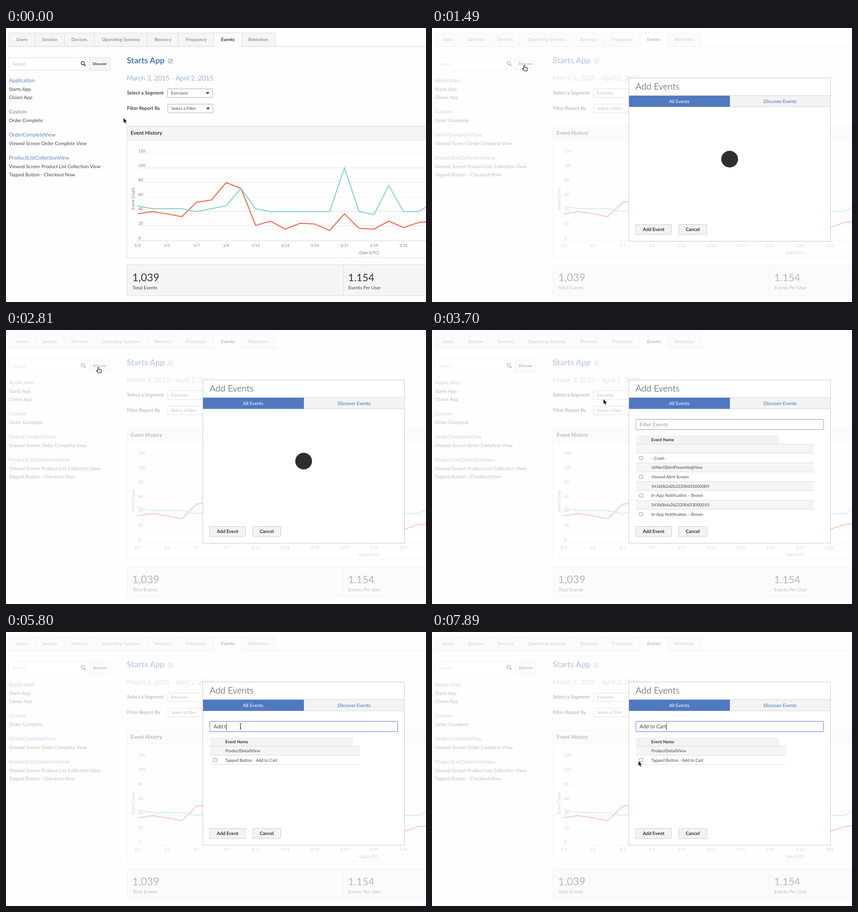
Animation, 925 px wide and 606 px high, one loop 8 s. Source, as an HTML page:

```html
<!DOCTYPE html>
<html lang="en">
<head>
<meta charset="utf-8">
<title>Add events</title>
<style>
  html, body { margin: 0; width: 100%; height: 100%; overflow: hidden; background: #fefefe; }
  svg { display: block; width: 100%; height: 100%; }
  text { font-family: Lato, "Open Sans", sans-serif; text-rendering: geometricPrecision; white-space: pre; }
</style>
</head>
<body>
<svg id="stage" viewBox="0 0 925 606"></svg>
<script>
const INK = '#444', GRAY = '#999', BLUE = '#4c77bd', LINK = '#5b84c7', PANEL = '#f5f5f5', LINE = '#dcdcdc';

// Drawing helpers
const text = (x, y, s, size, fill = INK, attrs = '') =>
  `<text x="${x}" y="${y}" font-size="${size}" fill="${fill}" ${attrs}>${s}</text>`;
const bold = 'font-weight="700"', light = 'font-weight="300"', middle = 'text-anchor="middle"';
const box = (x, y, w, h, fill, stroke = 'none', attrs = '') =>
  `<rect x="${x}" y="${y}" width="${w}" height="${h}" fill="${fill}" stroke="${stroke}" ${attrs}/>`;
const path = (d, stroke, width = 1, fill = 'none') =>
  `<path d="${d}" stroke="${stroke}" stroke-width="${width}" fill="${fill}"/>`;

function tabs() {
  const names = ['Users', 'Session', 'Devices', 'Operating Systems', 'Recency', 'Frequency', 'Events', 'Retention'];
  const edges = [6.5, 63.5, 128.5, 194.5, 311.5, 379.5, 458.5, 518.5, 593];
  let out = box(6.5, 11, 586.5, 30, PANEL, LINE) + path('M6 41H925', LINE);
  names.forEach((name, i) => {
    const active = name === 'Events', x = edges[i];
    if (active) out += box(x, 11.5, edges[i + 1] - x, 31, '#fefefe');
    if (i) out += path(`M${x} 11V41`, LINE);
    out += text((x + edges[i + 1]) / 2, 29.3, name, 10, active ? '#333' : GRAY, `${bold} ${middle}`);
  });
  return out + path('M458 11H519', LINE);
}

function sidebar() {
  const heads = [['Application', 119.5], ['Custom', 188.5], ['OrderCompleteView', 240], ['ProductListCollectionView', 291]];
  const items = [['Starts App', 139], ['Closes App', 157], ['Order Complete', 208],
    ['Viewed Screen Order Complete View', 259.3], ['Viewed Screen Product List Collection View', 310.4],
    ['Tapped Button - Checkout Now', 328.3]];
  return box(6.5, 65.5, 177.5, 28, '#fff', LINE) + box(184, 65.5, 45, 28, PANEL, LINE) +
    text(14.5, 82.5, 'Search', 10, '#bbb') + text(206.5, 82, 'Discover', 8, '#333', `${bold} ${middle}`) +
    `<circle cx="169" cy="77.7" r="3.6" fill="none" stroke="#444" stroke-width="1.7"/>` +
    path('M171.8 80.5L175.3 84', '#444', 2.3) +
    heads.map(([s, y]) => text(6.5, y, s, 11.45, LINK)).join('') +
    items.map(([s, y]) => text(6.5, y, s, 10.5)).join('');
}

function select(x, y, label) {
  return box(x, y, 99.5, 19, '#fff', '#aaa', 'rx="1"') + text(x + 7.7, y + 12.3, label, 9.1) +
    path(`M${x + 84.5} ${y + 7.6}h8l-4 4.4z`, 'none', 0, '#333');
}

function header() {
  return text(266, 78.3, 'Starts App', 18, BLUE, bold) +
    path('M364 68.5H357.5V77.5H366.5V72', '#999') + path('M360 75.5L366.5 68.5', '#888', 1.8) +
    text(266, 115.5, 'March 3, 2015 - April 2, 2015', 14.8, BLUE, light) +
    text(266.5, 146.8, 'Select a Segment', 10.6, INK, bold) + select(355.5, 134.5, 'Everyone') +
    text(266.5, 181.4, 'Filter Report By', 10.4, INK, bold) + select(356.5, 168.5, 'Select a Filter');
}

function chart() {
  const dayX = d => 289.5 + d * 32.556, valueY = v => 470.5 - v * 1.608;
  const line = (values, color) =>
    path('M' + values.map((v, d) => `${dayX(d).toFixed(1)} ${valueY(v).toFixed(1)}`).join('L'), color, 2.2);
  let out = box(266.5, 217.5, 700, 290, '#fefefe', LINE) + box(266.5, 217.5, 700, 30, PANEL, LINE) +
    text(274.5, 236, 'Event History', 11.45, '#333', bold);
  for (let v = 0; v <= 120; v += 20) {
    const y = Math.round(valueY(v)) - .5;
    out += path(`M289.5 ${y}H925`, v % 60 ? '#e2e2e2' : v ? '#f1f1f1' : '#d8d8d8') +
      text(291.5, y - 3, v, 8.8, '#777');
  }
  for (let d = 0; d < 20; d += 2)
    out += path(`M${dayX(d)} 470V475`, '#d8d8d8') + text(dayX(d), 483.7, `3/${d + 3}`, 8.3, '#777', middle);
  return out + text(799.5, 500, 'Date (UTC)', 8.85, '#777', middle) +
    text(0, 0, 'Event Count', 9, '#777', `${middle} transform="translate(282.5 377.5) rotate(-90)"`) +
    line([37, 40, 37, 33, 53, 56, 80, 72, 21, 27, 16, 24, 23, 14, 37, 17, 16, 27, 18, 25, 27], '#f3664a') +
    line([48, 44, 44, 44, 40, 44, 48, 72, 44, 40, 40, 40, 40, 40, 100, 40, 36, 76, 40, 40, 52], '#83d2d5');
}

const totals = () => box(266.5, 523.5, 476, 68.5, PANEL, LINE) + box(742.5, 523.5, 300, 68.5, PANEL, LINE) +
  text(278, 559.5, '1,039', 23.5, '#333') + text(278.5, 577.5, 'Total Events', 10.35) +
  text(753.5, 559.5, '1.154', 22.5, '#333') + text(754, 577.5, 'Events Per User', 10.35);

const button = (x, w, label) => box(x, 434.5, w, 22, '#f3f3f3', '#ccc', 'rx="1"') +
  text(x + w / 2, 449.2, label, 10.35, '#333', `${bold} ${middle}`);

const dialog = () => box(433.5, 110.5, 444, 361, '#fff', '#c8c8c8') + text(448.5, 136.3, 'Add Events', 19.8, '#333', light) +
  box(656, 149.5, 221.5, 25, '#f3f3f3', '#d4d4d4') + box(434, 149.5, 222, 25, '#5079c0') +
  text(544.5, 165.5, 'All Events', 10.4, '#fff', middle) + text(766.5, 165.5, 'Discover Events', 10.4, '#3f6fbe', middle) +
  button(448.5, 79, 'Add Event') + button(543, 62.5, 'Cancel');

// Rows alternate between group headings and events with a checkbox
function eventList(rows, right) {
  let out = box(449, 233, 315.5, 19.5, '#f3f3f3') + text(483, 245.8, 'Event Name', 9.3, '#333', bold);
  rows.forEach((label, i) => {
    const y = 262.5 + i * 20.7;
    out += i % 2
      ? box(456.5, y - 3.7, 8, 7.5, '#f4f4f4', '#999', 'rx="1.5"')
      : box(449, y - 10, right - 449, 20, PANEL) + path(`M449 ${y - 10}H${right}M449 ${y + 10}H${right}`, LINE);
    out += text(483, y + 3.3, label, 9.25);
  });
  return `<g clip-path="url(#listClip)">${out}</g>`;
}
const allRows = ['', '- Crash', 'UIAlertShimPresentingView', 'Viewed Alert Screen', '541b0b2d2b22200d33000009',
  'In-App Notification - Shown', '541b0b4a2b22200d33000010', 'In-App Notification - Shown'];
const foundRows = ['ProductDetailView', 'Tapped Button - Add to Cart'];

const stage = document.getElementById('stage');
stage.innerHTML = `
  <clipPath id="listClip"><rect x="434" y="225" width="443" height="188"/></clipPath>
  ${tabs() + sidebar() + header() + chart() + totals()}
  <g id="modal">
    ${box(0, 0, 925, 606, '#fff', 'none', 'opacity=".65"') + dialog()}
    <circle id="loader" cx="655.5" cy="290" r="18.5" fill="#2e2e30"/>
    <g id="results">
      ${box(449, 197.5, 413.5, 23, '#fff', '#999', 'id="field" rx="1"')}
      ${text(457, 213, '', 11.5, INK, 'id="query"')}
      ${box(457, 202, 1, 15, '#222', 'none', 'id="caret"')}
      <g id="all">${eventList(allRows, 841)}</g>
      <g id="found">${eventList(foundRows, 779.5) + path('M449 293.5H779.5', LINE)}</g>
    </g>
  </g>
  <g id="cursor">
    <g id="arrow">${path('M0 0V11.6L2.6 9.2L4.5 13.4L6.6 12.5L4.8 8.4H8.3Z', '#fff', .8, '#000')}</g>
    <g id="hand">${path('M-1.3 7.5V1Q-1.3-.3 0-.3T1.3 1V4.5Q2.6 3.8 3.4 4.8Q4.7 4.2 5.3 5.2Q6.8 4.9 6.8 6.4V9L5.6 12H-.6L-4 7.6Q-4.4 6-2.8 6.4Z', '#111', 1.1, '#fff') + path('M1.5 8V10M3.3 8V10', '#111', .7)}</g>
    <g id="beam">${path('M-2-6Q0-6 0-4.5Q0-6 2-6M0-5V5.5M-2 6.5Q0 6.5 0 5Q0 6.5 2 6.5M-1.3 2H1.3', '#222', 1.1)}</g>
  </g>`;

const part = {};
stage.querySelectorAll('[id]').forEach(el => part[el.id] = el);
const show = (name, on) => part[name].setAttribute('display', on ? 'inline' : 'none');

const LOOP = 8000, STEP = 148;
const moves = [
  { start: 600, steps: 5, from: [258.5, 198.5], to: [203.5, 83] },
  { start: 3560, steps: 6, from: [203.5, 83], to: [516.5, 208.5] },
  { start: 7290, steps: 5, from: [516.5, 208.5], to: [454.5, 285] },
];
const typing = [[5650, 'Add'], [5800, 'Add t'], [5950, 'Add to'], [6100, 'Add to '],
  [6240, 'Add to C'], [6390, 'Add to Ca'], [6540, 'Add to Cart']];

// The pointer jumps in even steps along an ease-out line
function pointerAt(t) {
  const { start, steps, from, to } = moves.filter(m => t >= m.start).pop() || moves[0];
  const step = t < start ? 0 : Math.min(steps, 1 + Math.floor((t - start + 10) / STEP));
  const ease = 1 - (1 - step / steps) ** 2;
  return from.map((a, i) => a + (to[i] - a) * ease);
}

function render(t) {
  const loaded = t >= 3560, focused = t >= 4300, filtered = t >= 5650;
  show('modal', t >= 1490);
  show('loader', !loaded);
  show('results', loaded);
  show('all', !filtered);
  show('found', filtered);

  const typed = (typing.filter(([at]) => t >= at).pop() || [0, ''])[1];
  part.query.textContent = typed || 'Filter Events';
  part.query.setAttribute('fill', typed ? INK : GRAY);
  part.field.setAttribute('stroke', focused ? '#4a78c8' : '#999');
  const caretOff = (t >= 4750 && t < 5650) || (t >= 6990 && t < 7440);
  show('caret', focused && !caretOff);
  if (loaded) part.caret.setAttribute('x', 457 + (typed ? Math.round(part.query.getComputedTextLength()) : 0));

  const [x, y] = pointerAt(t);
  const overButton = x > 184 && x < 229 && y < 93;
  const overField = loaded && x > 449 && x < 862 && y > 198 && y < 220;
  part.cursor.setAttribute('transform', `translate(${x} ${y})`);
  show('hand', overButton);
  show('beam', overField);
  show('arrow', !overButton && !overField);
}

const began = performance.now();
function tick() {
  render((performance.now() - began) % LOOP);
  requestAnimationFrame(tick);
}
tick();
</script>
</body>
</html>
```
